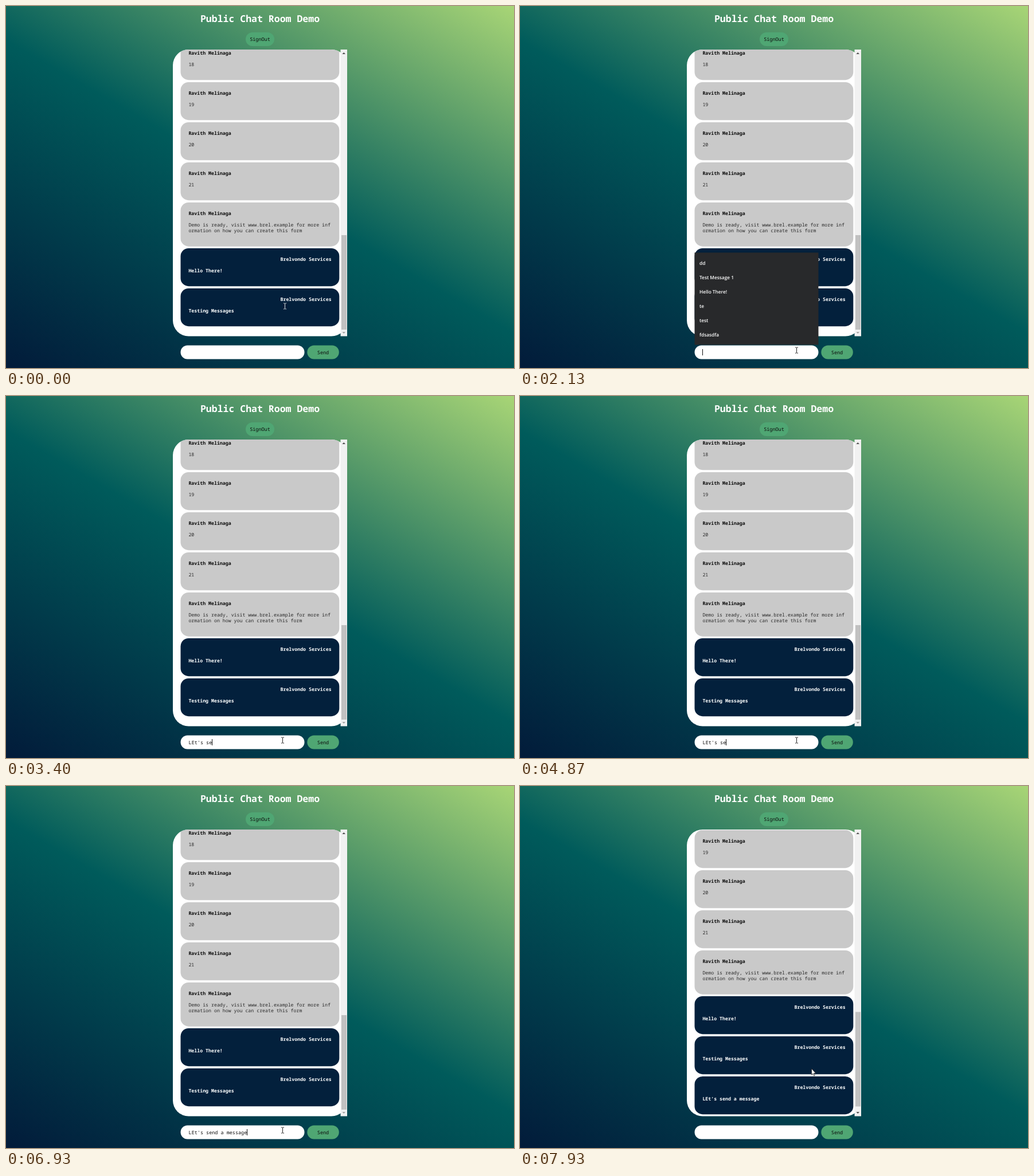
An HTML page that plays this animation: 886 px wide and 632 px high, repeating every 8 s.

```html
<!DOCTYPE html>
<html lang="en">
<head>
<meta charset="utf-8">
<title>Public Chat Room Demo</title>
<style>
  html, body { margin: 0; width: 100%; height: 100%; overflow: hidden; }
  body { background: linear-gradient(30deg, #021b3a, #005b5b 50%, #a8d576); }
  svg { display: block; }
  text { font: 8.26px "Noto Sans Mono", "DejaVu Sans Mono", monospace; text-rendering: geometricPrecision; }
  .title { font-size: 16.52px; font-weight: 700; fill: #fff; }
  .control { font-size: 8.47px; fill: #0c0c0c; }
  .mid { text-anchor: middle; }
  .name { font-weight: 600; fill: #0c0c0c; }
  .body { fill: #2a2a2a; }
  .own text { font-weight: 700; fill: #fff; }
  .own .name { text-anchor: end; }
  #menu text { font: 600 8.3px "Open Sans", "Noto Sans", sans-serif; fill: #fff; }
</style>
</head>
<body>
<svg width="886" height="632" viewBox="0 0 886 632">
  <clipPath id="panelClip"><rect x="291" y="76" width="304" height="500.5" rx="27.5"/></clipPath>

  <text class="title mid" x="443" y="28">Public Chat Room Demo</text>
  <rect x="418" y="46" width="50" height="24" rx="12" fill="#4fa673"/>
  <text class="control mid" x="443" y="61">SignOut</text>

  <g clip-path="url(#panelClip)">
    <rect x="291" y="76" width="304" height="501" fill="#fff"/>
    <g id="list"></g>
  </g>

  <rect x="583.5" y="76" width="11.5" height="500.5" fill="#f1f1f1"/>
  <rect id="thumb" x="585" y="400" width="9" height="165" fill="#c1c1c1"/>
  <path d="M586.4 84h5.6l-2.8-3z" fill="#505050"/>
  <path id="down" d="M586.4 569h5.6l-2.8 3z"/>

  <rect x="304.5" y="592.5" width="216" height="24" rx="12" fill="#fff"/>
  <text id="input" class="control" x="318.6" y="607.7"></text>
  <rect id="caret" y="599" width="1" height="11" fill="#111"/>
  <rect x="525.3" y="592.5" width="55.5" height="24" rx="12" fill="#4fa673"/>
  <text class="control mid" x="553" y="607.7">Send</text>

  <g id="menu"><rect x="304.5" y="430.5" width="216" height="161" fill="#28292b"/></g>

  <path id="beam" d="M-2.5-5H-.8L0-4.4 .8-5H2.5M0-4.4V4.4M-2.5 5H-.8L0 4.4 .8 5H2.5" fill="none"/>
  <path id="arrow" d="M.5.5V11.3L2.9 9 4.6 13 6.3 12.3 4.6 8.4H7.8z" fill="#fff" stroke="#111" stroke-width=".7"/>
</svg>
<script>
const $ = id => document.getElementById(id);
const LOOP = 8000, SENT = 7130, SCROLL = 56;
const DRAFT = "LEt's send a message";
const GUEST = 'Ravith Melinaga', OWNER = 'Brelvondo Services';

function add(parent, tag, attrs, content = '') {
  const el = document.createElementNS('http://www.w3.org/2000/svg', tag);
  for (const key in attrs) el.setAttribute(key, attrs[key]);
  el.textContent = content;
  return parent.appendChild(el);
}

// Adds one chat bubble; each extra line of text makes it taller
let nextY = 63;
function bubble(own, ...lines) {
  const g = add($('list'), 'g', own ? { class: 'own' } : {});
  const extra = (lines.length - 1) * 10.5;
  add(g, 'rect', { x: 304.5, y: nextY, width: 276.8, height: 66.2 + extra, rx: 14, fill: own ? '#03203c' : '#c9c9c9' });
  add(g, 'text', { class: 'name', x: own ? 567.6 : 318.4, y: nextY + 22.2 }, own ? OWNER : GUEST);
  lines.forEach((line, i) =>
    add(g, 'text', { class: 'body', x: 318.4, y: nextY + 41.7 + i * 10.5 }, line));
  nextY += Math.floor(70 + extra);
  return g;
}

for (let n = 18; n <= 21; n++) bubble(false, String(n));
bubble(false, 'Demo is ready, visit www.brel.example for more inf', 'ormation on how you can create this form');
bubble(true, 'Hello There!');
bubble(true, 'Testing Messages');
const reply = bubble(true, DRAFT);

['dd', 'Test Message 1', 'Hello There!', 'te', 'test', 'fdsasdfa'].forEach((label, i) =>
  add($('menu'), 'text', { x: 313, y: 452 + i * 25 }, label));

// [time, typed characters, caret visible]
const typing = [
  [0, 0, 0], [1070, 0, 1], [2330, 2, 1], [2470, 3, 1], [2800, 4, 1], [2870, 5, 1],
  [2930, 6, 1], [3200, 7, 1], [3400, 8, 1], [3930, 7, 0], [4130, 6, 0], [4470, 6, 1],
  [4870, 8, 1], [5130, 9, 1], [5270, 10, 1], [5400, 11, 1], [5600, 12, 1], [5870, 13, 1],
  [6070, 14, 1], [6130, 15, 1], [6400, 16, 1], [6600, 18, 1], [6870, 19, 1], [6930, 20, 1],
  [SENT, 0, 1], [7730, 0, 0]
];

// [time, pointer, x, y]
const moves = [
  [0, 'beam', 486.5, 524], [70, 'arrow', 480, 548], [330, 'arrow', 478, 556],
  [400, 'arrow', 475, 568], [470, 'arrow', 473, 580], [530, 'beam', 477, 600],
  [600, 'beam', 482.5, 601], [7870, 'arrow', 499, 540], [7930, 'arrow', 508, 493]
];

const at = (steps, t) => steps.findLast(step => step[0] <= t);
const show = (el, on) => el.setAttribute('visibility', on ? 'visible' : 'hidden');

function draw() {
  const t = performance.now() % LOOP;
  const sent = t >= SENT;

  show(reply, sent);
  $('list').setAttribute('transform', `translate(0 ${sent ? -SCROLL : 0})`);
  $('thumb').setAttribute('y', sent ? 394.5 : 400);
  $('down').setAttribute('fill', sent ? '#505050' : '#a3a3a3');
  show($('menu'), t >= 2130 && t < 2330);

  const [, count, caret] = at(typing, t);
  $('input').textContent = DRAFT.slice(0, count);
  $('caret').setAttribute('x', Math.floor(318.6 + count * 5.08));
  show($('caret'), caret);

  const [, pointer, x, y] = at(moves, t);
  for (const id of ['beam', 'arrow']) {
    show($(id), id === pointer);
    $(id).setAttribute('transform', `translate(${x} ${y})`);
  }
  $('beam').setAttribute('stroke', y < 560 ? '#ddd' : '#222');
  requestAnimationFrame(draw);
}
draw();
</script>
</body>
</html>
```
